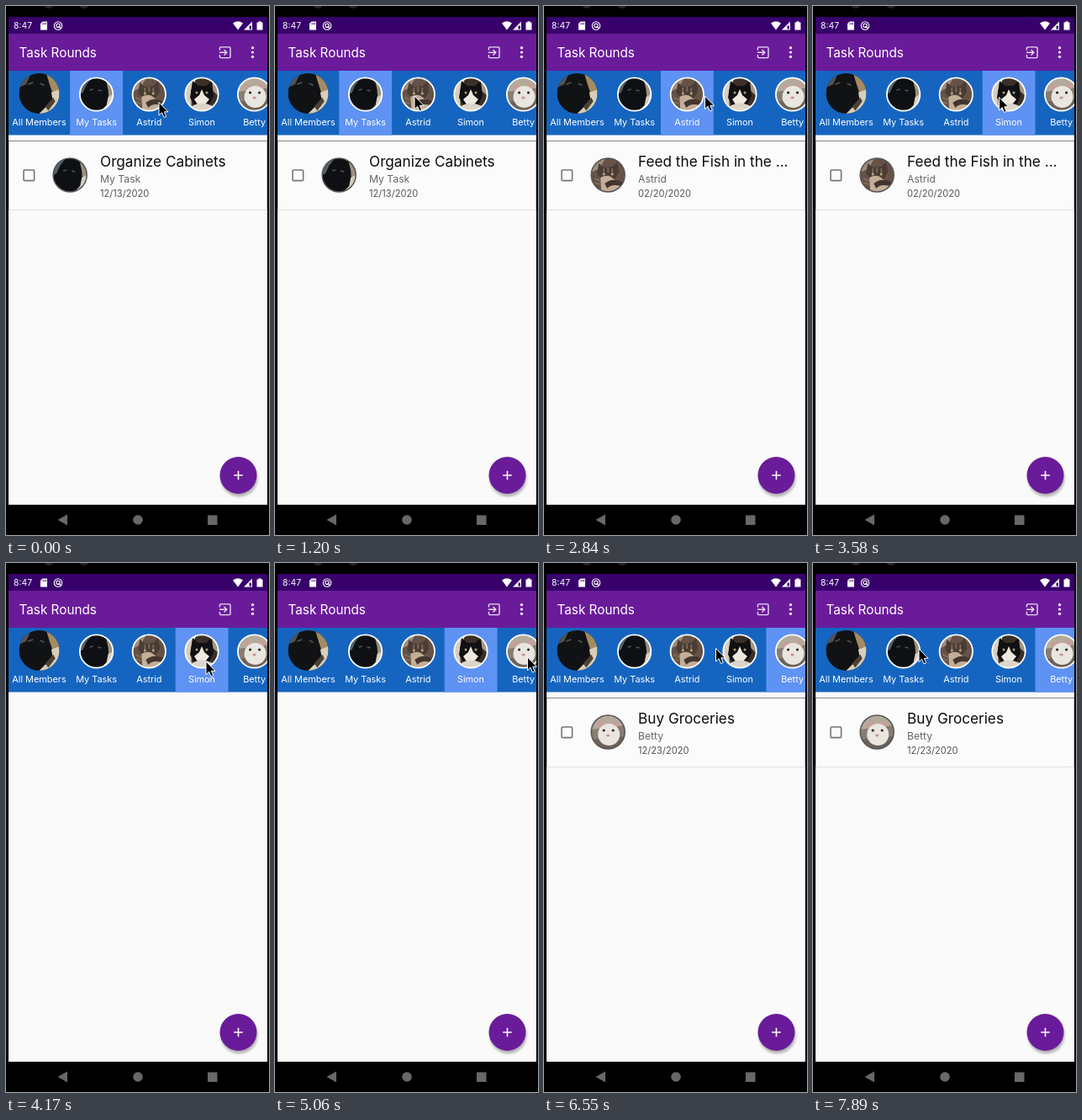
An HTML page for the animation above (8 s loop, 313 by 629 pixels).

```html
<!DOCTYPE html>
<html lang="en">
<head>
<meta charset="utf-8">
<title>Task Rounds</title>
<style>
  html, body { margin: 0; width: 100%; height: 100%; overflow: hidden; background: #000; }
  svg { display: block; width: 313px; height: 629px; font-family: Inter, Roboto, sans-serif; }
  .label { font-size: 10.9px; fill: #fff; text-anchor: middle; }
  .task { font-size: 17.2px; fill: #0c0c0c; }
  .owner { font-size: 12.2px; fill: #666; }
  .date { font-size: 11.1px; fill: #555; }
</style>
</head>
<body>
<svg viewBox="0 0 313 629">
  <defs>
    <clipPath id="screen"><rect x="3" y="13" width="308" height="580"/></clipPath>
    <clipPath id="round"><circle r="20"/></clipPath>
    <filter id="soft" x="-50%" y="-50%" width="200%" height="200%"><feGaussianBlur stdDeviation="1.7"/></filter>

    <g id="all">
      <rect x="-20" y="-20" width="40" height="40" fill="#111214"/>
      <path d="M-20-20H-8L-13-9-20-6z" fill="#55534f"/>
      <path d="M7-20H20V4L13-1 10-10z" fill="#a58b62"/>
      <path d="M12-1L20-4V20H0L6 14 14 10z" fill="#d8ceb9"/>
      <path d="M6 13L14 4 16 8 9 17z" fill="#4b4135"/>
      <path d="M-11-9l5-2M1-10l4 2" stroke="#4a4d4d" stroke-width="1.5"/>
    </g>
    <g id="mine">
      <rect x="-20" y="-20" width="40" height="40" fill="#0e1013"/>
      <path d="M-20-20H-5L-12-11-16-2-20 0z" fill="#55616a"/>
      <path d="M11-18L20-12V16L15 9 14-5z" fill="#9b917e"/>
      <path d="M14 3L20 0V20H5L12 13z" fill="#d5cec0"/>
      <path d="M-8-5l4-1M2-5l4 1" stroke="#4d5654" stroke-width="1.5"/>
    </g>
    <g id="tabby">
      <rect x="-20" y="-20" width="40" height="40" fill="#665247"/>
      <path d="M-20-20H-3L-10-8-20-3z" fill="#a08d7c"/>
      <path d="M-11-14L-5-9 5-10 11-16 13-3 7 6H-7L-13-2z" fill="#4b3d35"/>
      <path d="M-5-8v6M0-9v6M5-8v6M-16 4l7 3M-17 9l7 2" stroke="#82705f" stroke-width="1.5"/>
      <path d="M-9 3Q0-2 6 4L17 13 7 20H-8z" fill="#c3ae98"/>
      <path d="M-4 10Q6 2 18 9V14Q5 9-1 16z" fill="#44362e"/>
      <circle cx="-5" cy="-1" r="1.5" fill="#b5aa76"/><circle cx="5" cy="-1" r="1.5" fill="#b5aa76"/>
    </g>
    <g id="tuxedo">
      <rect x="-20" y="-20" width="40" height="40" fill="#3b3027"/>
      <path d="M-20-20H-6L-13-4-12 20H-20z" fill="#d7cebf"/>
      <path d="M9-20H20V2L13-4z" fill="#a79885"/>
      <path d="M-11-16L-4-10H5L12-16 14 2 8 14H-8L-14 4z" fill="#111013"/>
      <path d="M0-6L3 1 9 6 4 12H-5L-9 6-3 1z" fill="#eee8df"/>
      <path d="M-12 14Q0 7 13 14L9 20H-9z" fill="#ddd5c9"/>
      <circle cx="-6" cy="-2" r="1.5" fill="#a7a475"/><circle cx="6" cy="-2" r="1.5" fill="#a7a475"/>
    </g>
    <g id="hamster">
      <rect x="-20" y="-20" width="40" height="40" fill="#877d73"/>
      <path d="M-20-20H20V-8L-20-3z" fill="#b4aa9c"/>
      <path d="M-20 9L20 5V20H-20z" fill="#6d625b"/>
      <circle cx="-8" cy="-8" r="4" fill="#c79f98"/><circle cx="8" cy="-9" r="4" fill="#c79f98"/>
      <ellipse cx="1" cy="3" rx="13" ry="13" fill="#e9e5df"/>
      <circle cx="-5" cy="-2" r="1.6" fill="#292326"/><circle cx="6" cy="-2" r="1.6" fill="#292326"/>
      <ellipse cy="4" rx="2.2" ry="1.5" fill="#c99690"/>
    </g>
  </defs>

  <rect width="313" height="629"/>
  <circle cx="51" cy="-3" r="6" fill="#252525"/><circle cx="93" cy="-3" r="6" fill="#252525"/>

  <g clip-path="url(#screen)">
    <rect x="3" y="13" width="308" height="580" fill="#fafafa"/>
    <rect x="3" y="13" width="308" height="20" fill="#38006b"/>
    <rect x="3" y="33" width="308" height="44" fill="#6a1b9a"/>

    <g fill="#fff">
      <text x="9" y="27.4" font-size="10.4">8:47</text>
      <path d="M43.5 18.5H49V28.5H41V21z"/>
      <path d="M44 20v2.3M45.8 20v2.3M47.5 20v2.3" stroke="#38006b" stroke-width=".8"/>
      <g fill="none" stroke="#fff" stroke-width="1.1">
        <circle cx="62" cy="23.5" r="4.7"/><circle cx="62" cy="23.2" r="2.2"/><path d="M62.5 24l3 3"/>
      </g>
      <path d="M270 20.5Q276 16 282 20.5L276 28.5z"/>
      <path d="M293 18.5V28.5H283z"/>
      <path d="M289.5 23.5h2.5v4h-2.5z" fill="#38006b"/>
      <path d="M298.5 19.5h2v-1.2h3v1.2h2v9h-7z"/>
      <text x="15.5" y="60.8" font-size="15.3">Task Rounds</text>
      <circle cx="293.5" cy="49.7" r="1.6"/><circle cx="293.5" cy="55" r="1.6"/><circle cx="293.5" cy="60.3" r="1.6"/>
    </g>
    <path d="M254.4 52.5V50.2Q254.4 48.9 255.7 48.9H265.7Q267 48.9 267 50.2V60.3Q267 61.6 265.7 61.6H255.7Q254.4 61.6 254.4 60.3V58M254 55.2H262.5M259.5 51.9L262.8 55.2 259.5 58.5"
          fill="none" stroke="#e9dcf0" stroke-width="1.4"/>

    <rect x="3" y="77" width="308" height="76.5" fill="#1565c0"/>
    <rect id="highlight" y="77" width="62.8" height="76.5" fill="#5e92f3"/>
    <g id="members"></g>

    <g id="card">
      <rect x="3.5" y="160.5" width="307" height="82" fill="#fbfbfb" stroke="#dedede"/>
      <path d="M3 160.5H311" stroke="#858585"/>
      <path d="M3.5 161V242M310.5 161V242" stroke="#bdbdbd" stroke-width=".7"/>
      <rect x="21" y="195" width="12.6" height="12.6" rx="1.2" fill="none" stroke="#757575" stroke-width="1.6"/>
      <g transform="translate(76.2 201)">
        <use id="photo" clip-path="url(#round)"/>
        <circle r="20" fill="none" stroke="#555" stroke-width="1.5"/>
      </g>
      <text id="task" class="task" x="112" y="191"/>
      <text id="owner" class="owner" x="112" y="210"/>
      <text id="date" class="date" x="112" y="227"/>
    </g>

    <circle cx="277.5" cy="561.5" r="22" fill="#000" opacity=".28" filter="url(#soft)"/>
    <circle cx="276.5" cy="558" r="22" fill="#6a1b9a"/>
    <path d="M271.2 558h10.6M276.5 552.7v10.6" stroke="#fff" stroke-width="1.6"/>
  </g>

  <g fill="#686868">
    <path d="M61.5 611L73 604.5V617.5z"/>
    <circle cx="157" cy="611" r="5.8"/>
    <rect x="240" y="605.5" width="11.5" height="11.5"/>
  </g>

  <path id="cursor" d="M0 0V15.6L3.6 12.3 6 18 8.7 16.9 6.3 11.3H11z" fill="#000" stroke="#fff" stroke-linejoin="round"/>
</svg>

<script>
  const LOOP = 8000;
  const $ = id => document.getElementById(id);

  // name, photo, centre x, tab left edge
  const members = [
    ["All Members", "all", 39.5, 3],
    ["My Tasks", "mine", 107.6, 76.2],
    ["Astrid", "tabby", 170.3, 139],
    ["Simon", "tuxedo", 233, 201.7],
    ["Betty", "hamster", 295.6, 264.5]
  ];
  const tasks = {
    mine: ["Organize Cabinets", "My Task", "12/13/2020"],
    tabby: ["Feed the Fish in the ...", "Astrid", "02/20/2020"],
    hamster: ["Buy Groceries", "Betty", "12/23/2020"]
  };

  $("members").innerHTML = members.map(([name, photo, x], i) => `
    <g transform="translate(${x} ${i ? 105 : 104})${i ? "" : " scale(1.2)"}">
      <use href="#${photo}" clip-path="url(#round)"/>
      ${i ? '<circle r="19.7" fill="none" stroke="#fff" stroke-width="1.8"/>' : ""}
    </g>
    <text class="label" x="${x}" y="142">${name}</text>`).join("");

  // Each step holds until the next one: [time, value...]
  const selection = [[0, 1], [1940, 2], [3580, 3], [5800, 4]];
  const cards = [[0, "mine"], [2090, "tabby"], [3730, null], [6100, "hamster"]];
  const pointer = [
    [0, 182, 114.5], [1050, 172, 110], [1200, 166, 107],
    [2540, 171, 107], [2690, 181, 107], [2840, 191.5, 107],
    [2990, 203, 107], [3140, 214, 108], [3290, 221.5, 108.5],
    [3880, 224, 110], [4020, 230, 113], [4170, 238, 117],
    [4320, 247, 121], [4460, 254, 123], [4610, 258, 124], [4760, 260, 124],
    [5060, 300.5, 112], [5210, 296, 108], [5350, 290, 108], [5500, 287, 109],
    [6100, 279, 110], [6250, 247, 109], [6400, 219, 104], [6550, 204.5, 101.5],
    [7450, 190, 117], [7600, 162, 129], [7740, 135, 115], [7890, 126, 102]
  ];
  const at = (steps, t) => steps.findLast(step => step[0] <= t).slice(1);

  let shown;
  function showCard(photo) {
    if (photo === shown) return;
    shown = photo;
    $("card").style.display = photo ? "" : "none";
    if (!photo) return;
    $("photo").setAttribute("href", "#" + photo);
    ["task", "owner", "date"].forEach((id, i) => $(id).textContent = tasks[photo][i]);
  }

  function draw(now) {
    const t = now % LOOP;
    $("highlight").setAttribute("x", members[at(selection, t)[0]][3]);
    showCard(at(cards, t)[0]);
    $("cursor").setAttribute("transform", `translate(${at(pointer, t).join(" ")})`);
  }

  const start = performance.now();
  function tick() {
    draw(performance.now() - start);
    requestAnimationFrame(tick);
  }
  tick();
</script>
</body>
</html>
```
